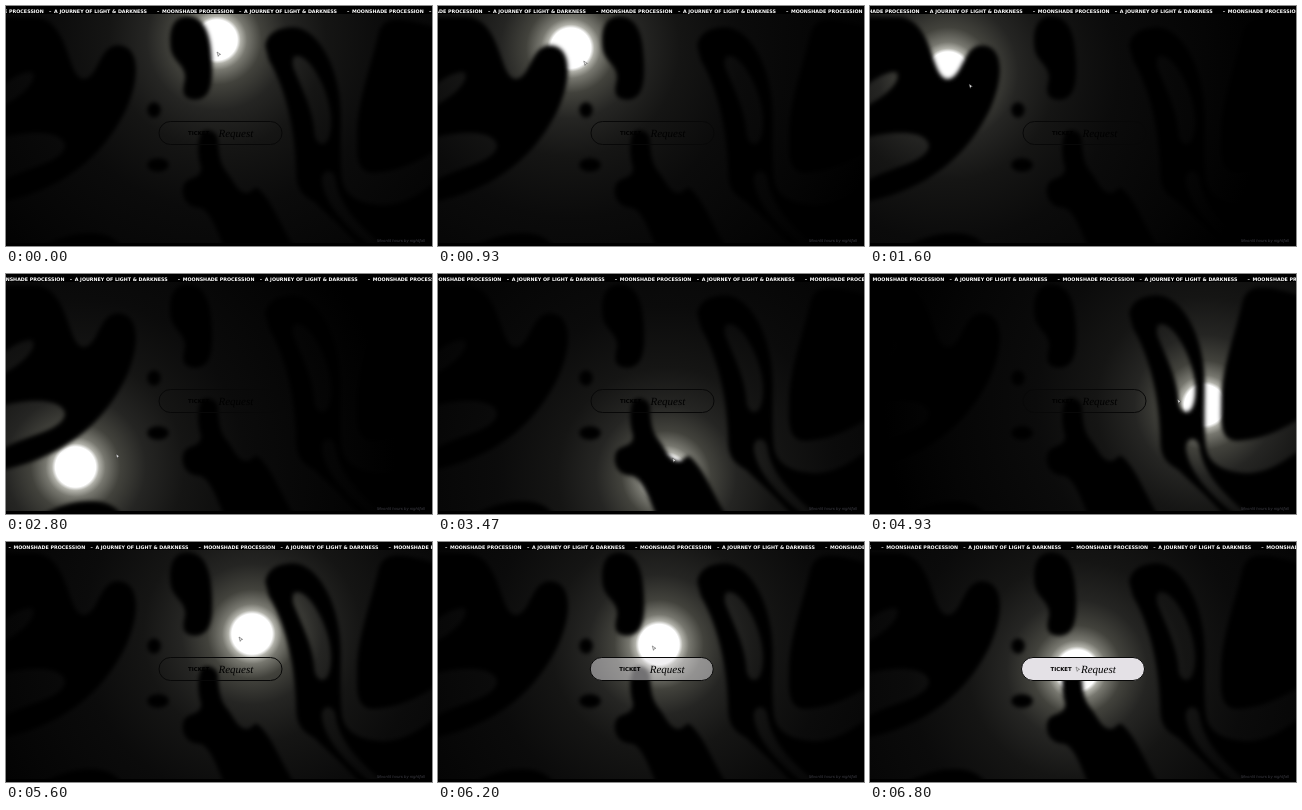
An HTML page for the animation above (6.87 s loop, 426 px wide and 240 px high).

```html
<!DOCTYPE html>
<html lang="en">
<head>
<meta charset="utf-8">
<title>Moonlight</title>
<style>
  html, body { margin: 0; height: 100%; overflow: hidden; background: #000; }
  svg { display: block; width: 100vw; height: 100vh; }
  text { font-family: Inter, sans-serif; text-rendering: geometricPrecision; }
  #band text { font: bold 4.8px "DejaVu Sans", sans-serif; fill: #fff; }
  #note { font-size: 4px; font-style: italic; fill: #3c3c44; }
  #button .wide { font: bold 5.4px "DejaVu Sans", sans-serif; }
  #button .script { font: italic 11px "Liberation Serif", serif; }
</style>
</head>
<body>
<svg viewBox="0 0 426 240">
  <defs>
    <radialGradient id="glow">
      <stop offset=".063" stop-color="#fff"/>
      <stop offset=".074" stop-color="#b0b0a8"/>
      <stop offset=".094" stop-color="#77776f"/>
      <stop offset=".14" stop-color="#42423c"/>
      <stop offset=".22" stop-color="#252523"/>
      <stop offset=".34" stop-color="#151514"/>
      <stop offset=".53" stop-color="#0b0b0b"/>
      <stop offset=".81" stop-color="#050505"/>
      <stop offset="1" stop-color="#000"/>
    </radialGradient>
    <!-- the alpha curve lets the light eat into soft edges -->
    <filter id="soft" filterUnits="userSpaceOnUse" x="-40" y="-40" width="506" height="320">
      <feGaussianBlur stdDeviation="2.4"/>
      <feComponentTransfer><feFuncA type="gamma" exponent="1.8"/></feComponentTransfer>
    </filter>
  </defs>

  <circle id="light" r="320" fill="url(#glow)"/>

  <g filter="url(#soft)" fill-rule="evenodd">
    <!-- left form with two openings -->
    <path d="M-30 10H30C65 14 62 71 78 72C92 70 92 38 112 38C136 39 135 72 122 102C102 145 60 192 -30 201Z
             M-10 86C2 76 14 67 26 67C29 73 20 88 -10 102Z
             M-10 135C15 126 56 124 58 140C54 157 22 158 -10 177Z"/>
    <path d="M20 250C45 232 65 226 84 226C105 226 115 234 122 250Z"/>
    <!-- hanging form -->
    <path d="M182 9C201 10 206 30 207 52C209 82 204 95 188 95C174 93 175 85 178 72C178 58 163 56 163 38C162 20 168 9 182 9Z"/>
    <!-- rising form -->
    <path d="M194 126C199 121 210 122 213 132C214 152 216 158 222 166C230 176 232 185 240 186C246 186 246 179 252 181C268 194 275 220 295 250H220C212 230 204 206 194 203C176 203 172 184 178 176C184 169 194 172 194 162C190 150 190 135 194 126Z"/>
    <ellipse cx="148" cy="104" rx="8" ry="9"/>
    <ellipse cx="152" cy="159" rx="12" ry="8"/>
    <!-- right loop, its tail and slit -->
    <path d="M258 40C260 24 275 20 288 20C315 22 336 65 336 110C336 135 335 150 337 172C339 192 360 198 380 198C405 196 418 182 460 155V260H400C360 228 332 205 328 172C326 164 317 164 317 174C320 200 345 225 380 250H360C335 220 315 205 308 197C296 190 289 185 289 165C288 120 277 80 262 55Z
             M288 52C300 44 324 85 324 115C324 140 314 142 310 130C309 105 298 85 288 60Z"/>
    <path d="M372 25C380 5 400 10 460 30V125C420 155 395 167 368 168C347 168 350 145 350 128C350 95 364 60 372 25Z"/>
  </g>

  <path d="M0 0H426V8H0ZM0 237H426V240H0Z"/>
  <g id="band"></g>
  <text id="note" x="371" y="236">Moonlit hours by nightfall</text>

  <g id="button">
    <rect x="151.5" y="115.5" width="123" height="23" rx="11.5" fill="#e4e1e6" fill-opacity="0" stroke="#080808"/>
    <text class="wide" x="180.5" y="129">TICKET</text>
    <text class="script" x="211" y="130.5">Request</text>
  </g>
  <path id="cursor" d="M0 0L3.6 2.4L2 2.8L1.2 4.4Z" fill="#eee" stroke="#222" stroke-width=".4"/>
</svg>

<script>
const LOOP = 6870, STEP = 1000 / 15, PERIOD = 190;
const $ = id => document.getElementById(id);
const times = [0, 930, 1600, 2800, 4200, 5600, 6800];
const lightPath = [[211, 34], [133, 42], [78, 66], [69.5, 193], [387, 181], [246, 92], [207, 128]];
const cursorPath = [[211, 46], [146, 55], [99, 78], [110, 180], [355, 165], [233, 95], [206, 125]];
const phrases = [[-34, "MOONSHADE PROCESSION"], [43, "–"], [48, "A JOURNEY OF LIGHT & DARKNESS"], [151, "–"]];
const pill = document.querySelector("#button rect");

for (let i = -1; i < 3; i++) {
  for (const [x, words] of phrases) {
    const label = document.createElementNS("http://www.w3.org/2000/svg", "text");
    label.setAttribute("x", x + i * PERIOD);
    label.setAttribute("y", 6.6);
    label.textContent = words;
    $("band").append(label);
  }
}

// Smooth Hermite curve through points at uneven times
function along(points, t) {
  const last = times.length - 1;
  let i = 0;
  while (i < last - 1 && t >= times[i + 1]) i++;
  const span = times[i + 1] - times[i], u = Math.min(1, (t - times[i]) / span);
  return [0, 1].map(k => {
    const slope = j => {
      const a = Math.max(0, j - 1), b = Math.min(last, j + 1);
      return (points[b][k] - points[a][k]) / (times[b] - times[a]) * span;
    };
    const p = points[i][k], q = points[i + 1][k], m = slope(i), n = slope(i + 1);
    return p + u * (m + u * (3 * (q - p) - 2 * m - n + u * (2 * (p - q) + m + n)));
  });
}

const move = (id, x, y) => $(id).setAttribute("transform", `translate(${x} ${y})`);

function draw(now) {
  const t = Math.floor((now % LOOP + 4) / STEP) * STEP;
  const hover = Math.max(0, Math.min(1, (t - 6050) / 300));
  move("light", ...along(lightPath, t));
  move("cursor", ...along(cursorPath, t));
  move("band", t * .0074, 0);
  move("button", 1.5 * (1 - hover), 0);
  pill.setAttribute("fill-opacity", hover);
  requestAnimationFrame(draw);
}
draw(0);
</script>
</body>
</html>
```
